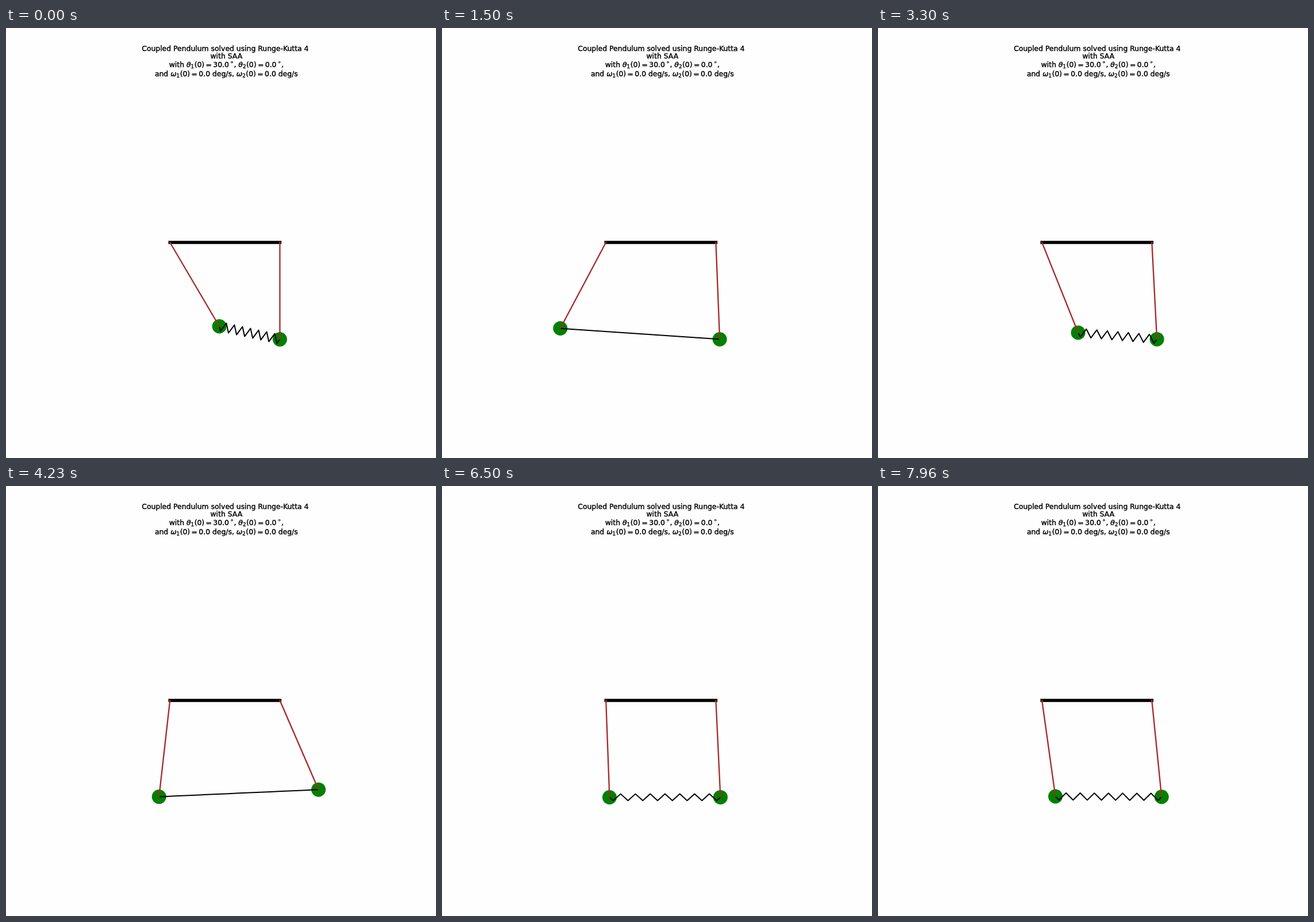
Animation of 748 by 748 pixels, one loop 8 s. Source, as an HTML page with a canvas:

```html
<!DOCTYPE html>
<html lang="en">
<head>
<meta charset="utf-8">
<title>Coupled Pendulum</title>
<style>
  html, body { margin: 0; width: 100%; height: 100%; overflow: hidden; background: #fefefe; }
  canvas { display: block; width: 748px; height: 748px; }
</style>
</head>
<body>
<canvas id="stage"></canvas>
<script>
const SIZE = 748, LOOP = 8000;
const canvas = document.getElementById('stage');
const ctx = canvas.getContext('2d');
const ratio = window.devicePixelRatio || 1;
canvas.width = canvas.height = SIZE * ratio;
ctx.scale(ratio, ratio);

const LEFT = 285.2, RIGHT = 476.4, TOP = 373;
const ROD_X = 171.8, ROD_Y = 168.6, BOB = 12.5;
const SLOW = 0.0572, FAST = 0.0726;      // normal modes, radians per step
const NODES = 15, COIL = 17.4;
const FONT = 12.4, MID = 383.3;

function polyline(points, color, width, cap = 'square') {
  ctx.beginPath();
  points.forEach(([x, y]) => ctx.lineTo(x, y));
  ctx.strokeStyle = color;
  ctx.lineWidth = width;
  ctx.lineCap = cap;
  ctx.lineJoin = 'round';
  ctx.stroke();
}

function bobAt(pivot, degrees) {
  const a = degrees * Math.PI / 180;
  return [pivot + ROD_X * Math.sin(a), TOP + ROD_Y * Math.cos(a)];
}

function disc([x, y]) {
  ctx.beginPath();
  ctx.arc(x, y, BOB, 0, 2 * Math.PI);
  ctx.fillStyle = '#008000';
  ctx.fill();
}

// Zigzag of constant wire length; it goes straight when fully stretched.
function spring(a, b) {
  const dx = b[0] - a[0], dy = b[1] - a[1], len = Math.hypot(dx, dy);
  const ux = dx / len, uy = dy / len;
  const amp = Math.sqrt(Math.max(0, COIL ** 2 - (len / NODES) ** 2)) / 2;
  const points = [a];
  for (let i = 0; i < NODES; i++) {
    const along = len * (i + 0.5) / NODES, side = i % 2 ? -amp : amp;
    points.push([a[0] + ux * along - uy * side, a[1] + uy * along + ux * side]);
  }
  points.push(b);
  polyline(points, '#000', 2);
}

// Runs of text: plain, italic symbol, subscript, relation, degree ring
const plain = text => ({ text });
const symbol = text => ({ text, italic: true });
const sub = text => ({ text, scale: 0.7, dy: 2, after: 0.6 });
const equals = { text: '=', before: 2.4, after: 2.4 };
const ring = { ring: true };

const LINES = [
  [40, [plain('Coupled Pendulum solved using Runge-Kutta 4 ')]],
  [53, [plain('with SAA')]],
  [67.5, [plain('with '), symbol('θ'), sub('1'), plain('(0)'), equals, plain('30.0'), ring,
          plain(', '), symbol('θ'), sub('2'), plain('(0)'), equals, plain('0.0'), ring, plain(',')]],
  [83.5, [plain('and '), symbol('ω'), sub('1'), plain('(0)'), equals, plain('0.0 deg/s, '),
          symbol('ω'), sub('2'), plain('(0)'), equals, plain('0.0 deg/s')]]
];

function setFont(run) {
  const style = run.italic ? 'italic ' : '';
  ctx.font = `${style}${FONT * (run.scale || 1)}px "DejaVu Sans", sans-serif`;
}

function advance(run) {
  if (run.ring) return 8.5;
  setFont(run);
  return (run.before || 0) + ctx.measureText(run.text).width + (run.after || 0);
}

function textLine(baseline, runs) {
  let x = MID - runs.reduce((sum, run) => sum + advance(run), 0) / 2;
  ctx.fillStyle = ctx.strokeStyle = '#000';
  ctx.lineWidth = 0.4;
  for (const run of runs) {
    const width = advance(run);
    if (run.ring) {
      ctx.lineWidth = 1;
      ctx.beginPath();
      ctx.arc(x + 5, baseline - 8, 1.4, 0, 2 * Math.PI);
      ctx.stroke();
      ctx.lineWidth = 0.4;
    } else {
      const left = x + (run.before || 0), y = baseline + (run.dy || 0);
      ctx.fillText(run.text, left, y);
      ctx.strokeText(run.text, left, y);
    }
    x += width;
  }
}

// Steps last 30, 30 and 40 ms in turn.
function stepAt(ms) {
  const rest = ms % 100;
  return 3 * Math.floor(ms / 100) + (rest < 30 ? 0 : rest < 60 ? 1 : 2);
}

function draw(ms) {
  const step = stepAt(ms);
  const together = 15 * Math.cos(SLOW * step), apart = 15 * Math.cos(FAST * step);
  const a = bobAt(LEFT, together + apart), b = bobAt(RIGHT, together - apart);

  ctx.fillStyle = '#fefefe';
  ctx.fillRect(0, 0, SIZE, SIZE);
  LINES.forEach(([y, runs]) => textLine(y, runs));
  polyline([[LEFT, TOP], [RIGHT, TOP]], '#000', 5.4);
  disc(a);
  disc(b);
  spring(a, b);
  polyline([[LEFT, TOP], a], '#a52a2a', 2.3);
  polyline([[RIGHT, TOP], b], '#a52a2a', 2.3);
}

const start = performance.now();
function tick() {
  draw((performance.now() - start) % LOOP);
  requestAnimationFrame(tick);
}
tick();
</script>
</body>
</html>
```
